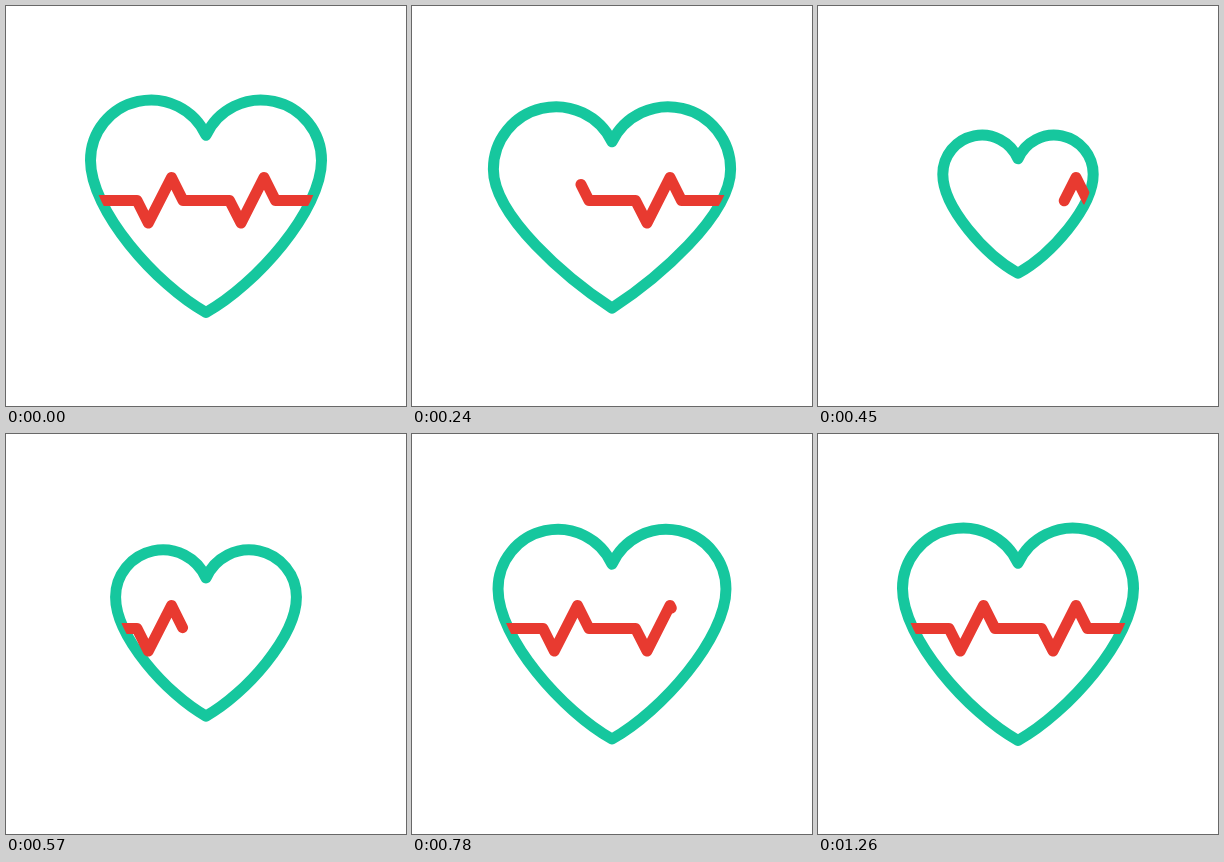
Recreate the animation shown at these times as an HTML page. Size 400 px wide and 400 px high, loop 1290 ms.

```html
<!DOCTYPE html>
<html lang="en">
<head>
<meta charset="utf-8">
<title>Heartbeat</title>
<style>
  html, body { margin: 0; width: 100%; height: 100%; overflow: hidden; background: #fff; }
  svg { display: block; width: 100vw; height: 100vh; }
  path { fill: none; stroke-width: 11; stroke-linecap: round; stroke-linejoin: round; }
  #heart { stroke: #16c79e; }
  .pulse { stroke: #e83a30; }
</style>
</head>
<body>
<svg viewBox="0 0 400 400">
  <clipPath id="inside"><path id="clip"/></clipPath>
  <path id="heart"/>
  <g clip-path="url(#inside)">
    <path class="pulse" id="old"/>
    <path class="pulse" id="fresh"/>
  </g>
</svg>
<script>
const LOOP = 1290, STEP = 30;
const [heart, clip, old, fresh] =
  ['heart', 'clip', 'old', 'fresh'].map(id => document.getElementById(id));

const PULSE = 'M84 194.5H131L142.3 217L165.5 171.5L177 194.5H223.5L235 217L258 171.5L269.5 194.5H316';
old.setAttribute('d', PULSE);
fresh.setAttribute('d', PULSE);
const length = old.getTotalLength();

// Lobe radius, lobe offset, lobe height, tip height, side handle, tip handle x and y
const REST  = [60.5, 55, 154.5, 306.5, 50, 50, 28];
const SMALL = [43.9, 39.3, 170.7, 272, 34, 24, 15];
const WIDE  = [67, 60.2, 161.4, 309.5, 50, 50, 33];
const TIGHT = [39.2, 36, 168.3, 267.3, 33, 33, 18.5];

const beat = bezier(0.33, 0.4), settle = bezier(0.37, 0.12);
const MOVES = [
  [0, 150, REST, SMALL, beat],
  [150, 300, SMALL, WIDE, beat],
  [300, 450, WIDE, TIGHT, beat],
  [450, 900, TIGHT, REST, settle]
];

// cubic-bezier(a, 0, b, 1)
function bezier(a, b) {
  return x => {
    let lo = 0, hi = 1;
    for (let i = 0; i < 24; i++) {
      const s = (lo + hi) / 2, r = 1 - s;
      if (3 * a * s * r * r + 3 * b * s * s * r + s * s * s < x) lo = s; else hi = s;
    }
    return lo * lo * (3 - 2 * lo);
  };
}

const progress = (t, from, to) => Math.min(1, Math.max(0, (t - from) / (to - from)));

function heartPath([r, d, cy, tip, side, qx, qy]) {
  const notch = cy - Math.sqrt(r * r - d * d);
  const left = 200 - d - r, right = 200 + d + r;
  return `M200 ${notch}A${r} ${r} 0 0 0 ${left} ${cy}` +
    `C${left} ${cy + side} ${200 - qx} ${tip - qy} 200 ${tip}` +
    `C${200 + qx} ${tip - qy} ${right} ${cy + side} ${right} ${cy}` +
    `A${r} ${r} 0 0 0 200 ${notch}Z`;
}

function shapeAt(t) {
  const move = MOVES.find(m => t < m[1]);
  if (!move) return REST;
  const [start, end, a, b, ease] = move;
  const p = ease(progress(t, start, end));
  return a.map((v, i) => v + (b[i] - v) * p);
}

function render(t) {
  const d = heartPath(shapeAt(t));
  heart.setAttribute('d', d);
  clip.setAttribute('d', d);

  const erased = length * progress(t, 0, 630);
  old.style.display = t < 555 ? '' : 'none';
  old.style.strokeDasharray = `${length + 1} ${length * 2}`;
  old.style.strokeDashoffset = -erased;

  const drawn = length * (1 - Math.pow(1 - progress(t, 420, 1260), 2.86));
  fresh.style.display = drawn > 0 ? '' : 'none';
  fresh.style.strokeDasharray = `${drawn} ${length * 2}`;
}

const origin = performance.now();
function tick() {
  const t = (performance.now() - origin) % LOOP;
  render(Math.floor(t / STEP) * STEP);
  requestAnimationFrame(tick);
}
tick();
</script>
</body>
</html>
```
